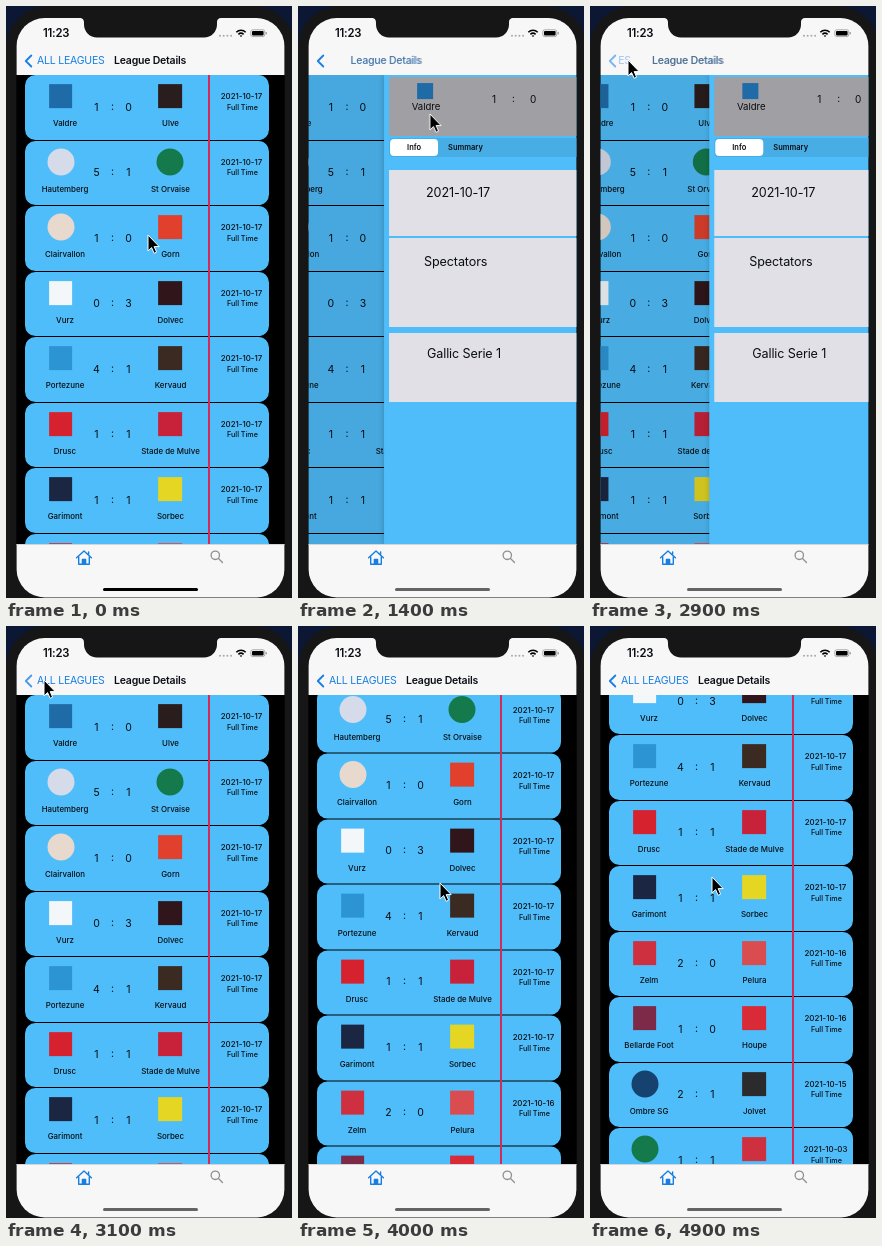
An HTML page that plays this animation: 286x592 px, repeating every 5000 ms.

```html
<!DOCTYPE html>
<html lang="en">
<head>
<meta charset="utf-8">
<title>League details</title>
<style>
@property --p { syntax: "<number>"; inherits: true; initial-value: 0; }
@property --scroll { syntax: "<length>"; inherits: true; initial-value: 0px; }

html, body { margin: 0; width: 100%; height: 100%; overflow: hidden; }
body { background: #0c1733; font-family: Inter, "Liberation Sans", sans-serif; color: #0a0d12; }
#stage { position: relative; width: 286px; height: 592px; overflow: hidden; }
#stage * { position: absolute; box-sizing: border-box; }

.bezel { left: 0; top: 0; width: 289px; height: 640px; border-radius: 42px; background: #161617; }
.screen {
  inset: 0; background: #000;
  clip-path: inset(12px 7.6px .6px 10.6px round 28px);
  animation: push 5s linear infinite paused, scroll 5s linear infinite paused;
}
.t { line-height: 1; white-space: nowrap; transform: translateY(-50%); }
.c { transform: translate(-50%, -50%); }
.mark { transform: translate(-50%, -50%); }
.round { border-radius: 50%; }

/* match list */
.view { left: 10px; top: 69px; width: 269px; height: 469px; overflow: hidden; }
.list { inset: 0; background: #000; transform: translateX(calc(var(--p) * -80px)); }
.rows { left: 1px; top: .4px; width: 267px; transform: translateY(calc(var(--scroll) * -1)); }
.row { left: 7.5px; width: 244px; height: 64.6px; border-radius: 10.5px; background: #4fbdf9; }
.row::after { content: ""; position: absolute; left: 183.8px; top: 0; width: 1.4px; height: 65.5px; background: #d32a58; }
.name, .date { font-size: 7.9px; }
.state { font-size: 7.2px; }
.row .t { font-weight: 500; }
.row .score { font-size: 10.5px; font-weight: 400; }
.dim { inset: 0; background: #000; opacity: calc(var(--p) * .15); }

/* match details */
.detail {
  left: 1px; top: 0; width: 268px; height: 100%; background: #4fbdf9;
  transform: translateX(calc((1 - var(--p)) * 268px));
  box-shadow: -1px 0 5px rgb(0 0 0 / calc(var(--p) * .25));
}
.head, .card, .tabs { left: 5px; width: 257px; }
.head { top: 2px; height: 59px; background: #a09fa3; }
.head .name { font-size: 9.6px; }
.head .score { font-size: 10px; }
.tabs { top: 63px; height: 19px; border-radius: 4px; background: #48ade5; font-size: 7.5px; font-weight: 600; }
.pill { left: 1px; top: 1px; width: 48px; height: 17px; border-radius: 4px; background: #fff; }
.card { background: #e1e0e7; font-size: 12.6px; letter-spacing: -.01em; }

/* bars */
.nav { left: 0; top: 0; width: 286px; height: 69px; background: #f7f7f8; }
.nav .t { font-size: 10.5px; letter-spacing: -.02em; }
.nav .time { left: 37px; top: 27.5px; font-size: 11.3px; font-weight: 600; }
.back { left: 28px; top: 40px; width: 250px; height: 28px; overflow: hidden; color: #177fe4; }
.back .t { left: 3px; top: 15.3px; }
.all { transform: translate(calc(var(--p) * -97px), -50%) !important; opacity: calc(1 - var(--p)); }
.prev { transform: translate(calc((1 - var(--p)) * 77px), -50%) !important; opacity: var(--p); }
.title {
  left: 108px; top: 55.3px; font-weight: 600; opacity: calc(1 - var(--p));
  transform: translate(calc(var(--p) * -77px), -50%) !important;
}
.bar { left: 0; top: 538px; width: 286px; height: 54px; background: #f7f7f8; border-top: .5px solid #d5d5d8; }
.pillar { left: 97px; top: 581.5px; width: 95px; height: 3px; border-radius: 2px; animation: tone 5s linear infinite paused; }
svg { left: 0; top: 0; overflow: visible; }
.chevron { animation: press 5s linear infinite paused; }
.cursor { animation: move 5s ease-in-out infinite paused; }

@keyframes push {
  0%, 24% { --p: 0; }
  26% { --p: .2; }
  28% { --p: .72; }
  30% { --p: .95; }
  32%, 54% { --p: 1; }
  56% { --p: .95; }
  58% { --p: .596; }
  60% { --p: .18; }
  62%, 100% { --p: 0; }
}
@keyframes scroll {
  0%, 74% { --scroll: 0px; }
  76% { --scroll: 14px; }
  78% { --scroll: 40px; }
  80% { --scroll: 72.5px; animation-timing-function: cubic-bezier(.2, .56, .4, 1); }
  98%, 100% { --scroll: 222px; }
}
@keyframes move {
  0%, 4% { transform: translate(142px, 229px); }
  22%, 25% { transform: translate(129px, 106px); }
  40% { transform: translate(164px, 129px); }
  54%, 64% { transform: translate(38px, 54px); }
  72%, 74% { transform: translate(137px, 333px); animation-timing-function: ease-in; }
  80% { transform: translate(142px, 257px); animation-timing-function: ease-out; }
  84% { transform: translate(139px, 241px); }
  98%, 100% { transform: translate(122px, 251px); }
}
@keyframes tone {
  0%, 26% { background: #000; }
  28%, 100% { background: #646466; }
}
@keyframes press {
  0%, 55%, 64%, 100% { opacity: 1; }
  56%, 60% { opacity: .55; }
}
</style>
</head>
<body>
<div id="stage">
  <div class="bezel"></div>
  <div class="screen">
    <div class="view">
      <div class="list"><div class="rows"></div><div class="dim"></div></div>
      <div class="detail">
        <div class="head"></div>
        <div class="tabs">
          <div class="pill"></div>
          <span class="t c" style="left:25px;top:9.5px">Info</span>
          <span class="t" style="left:59px;top:9.5px">Summary</span>
        </div>
        <div class="card" style="top:95px;height:66px"><span class="t" style="left:37px;top:23px">2021-10-17</span></div>
        <div class="card" style="top:163px;height:89px"><span class="t" style="left:35px;top:24px">Spectators</span></div>
        <div class="card" style="top:258px;height:69px"><span class="t" style="left:38px;top:21px">Gallic Serie 1</span></div>
      </div>
    </div>

    <div class="nav">
      <span class="t time">11:23</span>
      <div class="back"><span class="t all">ALL LEAGUES</span><span class="t prev">League Details</span></div>
      <span class="t title">League Details</span>
      <svg width="286" height="69" fill="none">
        <path d="M73 11h143v1c-4 0-5 1.500-5 5v1.500a13 13 0 0 1-13 13H91a13 13 0 0 1-13-13V17c0-3.500-1-5-5-5z" fill="#161617"/>
        <path class="chevron" d="M25.3 49.5L19.8 55l5.5 5.5" stroke="#177fe4" stroke-width="1.8" stroke-linecap="round" stroke-linejoin="round"/>
        <path d="M214 29.8h12" stroke="#a9a9ac" stroke-width="2" stroke-linecap="round" stroke-dasharray="0 3.7"/>
        <path d="M230.3 26.2a6.7 6.7 0 0 1 9.4 0M232.4 28.4a3.8 3.8 0 0 1 5.2 0" stroke="#000" stroke-width="1.6"/>
        <path d="M233.7 29.7L235 31.1l1.3-1.4a2 2 0 0 0-2.6 0z" fill="#000"/>
        <rect x="244.8" y="23.8" width="14" height="6.8" rx="2" stroke="#8a8a8c" stroke-width=".7"/>
        <rect x="246" y="25" width="11.6" height="4.4" rx="1" fill="#000"/>
        <path d="M260.2 26v2.4" stroke="#8a8a8c"/>
      </svg>
    </div>

    <div class="bar"></div>
    <svg width="286" height="592" fill="none">
      <g stroke="#177fe4" stroke-width="1.4" stroke-linejoin="round" stroke-linecap="round">
        <path d="M70.6 551.8L78 545l7.4 6.8M72.7 551v7.3h10.6V551M82.6 546v2.5"/>
        <path d="M76.4 558v-4.6h3.2v4.6z" fill="#177fe4"/>
      </g>
      <g stroke="#909093" stroke-width="1.3" stroke-linecap="round">
        <circle cx="209.3" cy="549.3" r="4.2"/><path d="M212.5 552.5l4 4"/>
      </g>
    </svg>
    <div class="pillar"></div>
  </div>

  <svg width="286" height="592">
    <path class="cursor" d="M0 0v16l3.600-3.400 2.500 5.700 2.500-1.100-2.400-5.600h5z" fill="#000" stroke="#fff" stroke-width="1" stroke-linejoin="round"/>
  </svg>
</div>

<script>
// club: name, badge colour, round badge?
const clubs = {
  a: ["Valdre", "#1f6ba8"], b: ["Ulve", "#2a1d1e"],
  c: ["Hautemberg", "#d5dbe8", 1], d: ["St Orvaise", "#147a4c", 1],
  e: ["Clairvallon", "#e8d9ce", 1], f: ["Gorn", "#e0402c"],
  g: ["Vurz", "#f4f7fa"], h: ["Dolvec", "#30161a"],
  i: ["Portezune", "#2d94d4"], j: ["Kervaud", "#3b2a22"],
  k: ["Drusc", "#d6222e"], l: ["Stade de Mulve", "#c8223a"],
  m: ["Garimont", "#1b2642"], n: ["Sorbec", "#e4d622"],
  o: ["Zelm", "#cf3040"], p: ["Pelura", "#d94d50"],
  q: ["Bellarde Foot", "#7c2a48"], r: ["Houpe", "#d92a38"],
  s: ["Ombre SG", "#15426f", 1], t: ["Jolvet", "#2b2b2d"]
};
// home, away, goals, goals, day of the month
const games = [
  "a b 1 0 17", "c d 5 1 17", "e f 1 0 17", "g h 0 3 17", "i j 4 1 17", "k l 1 1 17",
  "m n 1 1 17", "o p 2 0 16", "q r 1 0 16", "s t 2 1 15", "d o 1 1 03"
].map(g => g.split(" "));

const text = (kind, x, y, s) =>
  `<span class="t c ${kind}" style="left:${x}px;top:${y}px">${s}</span>`;

function badge([, color, round], x, y, size) {
  const side = round ? size : size * .88;
  return `<i class="mark ${round ? "round" : ""}" style="left:${x}px;top:${y}px;` +
    `width:${side}px;height:${side}px;background:${color}"></i>`;
}

function row([home, away, x, y, day], i) {
  return `<div class="row" style="top:${i * 65.5}px">` +
    badge(clubs[home], 36, 21, 27) + badge(clubs[away], 145.5, 21, 27) +
    text("name", 40.5, 48.8, clubs[home][0]) + text("name", 146, 48.8, clubs[away][0]) +
    text("score", 72, 32.3, x) + text("score", 88, 31.3, ":") + text("score", 104, 32.3, y) +
    text("date", 217, 21.8, "2021-10-" + day) + text("state", 218, 32.5, "Full Time") +
    "</div>";
}

const find = s => document.querySelector(s);
find(".rows").innerHTML = games.map(row).join("");
find(".head").innerHTML =
  badge(clubs.a, 36, 14, 18) + badge(clubs.b, 212, 14, 18) +
  text("name", 37, 30, clubs.a[0]) + text("name", 212, 30, clubs.b[0]) +
  text("score", 105, 21.5, 1) + text("score", 124.5, 21, ":") + text("score", 144, 21.5, 0);

// Advance the paused CSS animations ten times a second.
const tracks = document.getAnimations();
const start = performance.now();
function tick() {
  const time = Math.floor((performance.now() - start) % 5000 / 100) * 100;
  for (const track of tracks) track.currentTime = time;
  requestAnimationFrame(tick);
}
tick();
</script>
</body>
</html>
```
